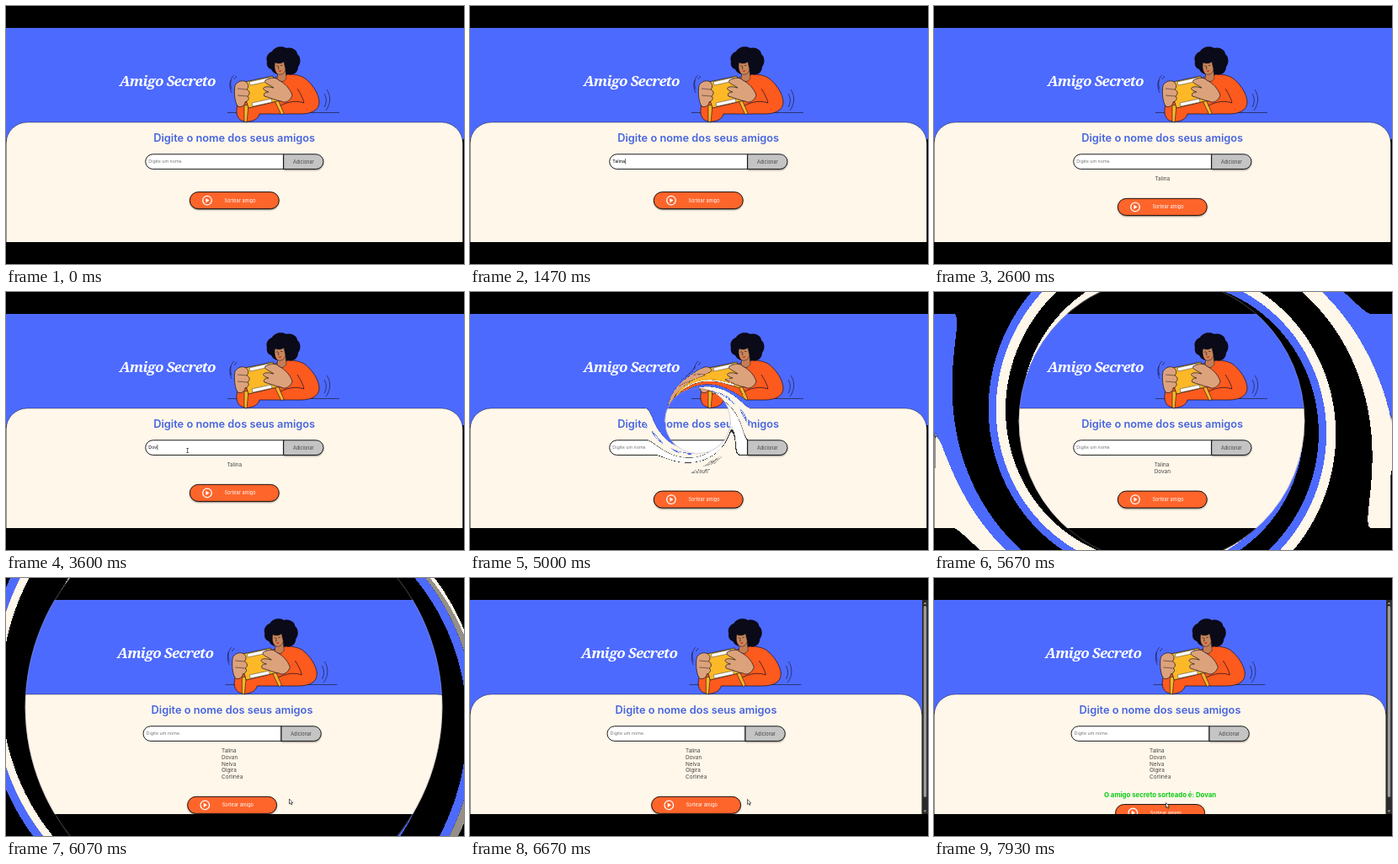
These frames come from a looping animation (544x306 px, 8140 ms). An HTML page with a canvas:

```html
<!DOCTYPE html>
<html lang="pt-BR">
<head>
<meta charset="utf-8">
<title>Amigo Secreto</title>
<style>
html, body { margin: 0; width: 100%; height: 100%; overflow: hidden; background: #000; }
canvas { display: block; }
</style>
</head>
<body>
<canvas id="stage" width="544" height="306"></canvas>
<script>
const LOOP = 8140, WIDTH = 544, HEIGHT = 306;
const CUT = 5720, RESULT = 7530, SWIRL_START = 4800, SWIRL_END = 6410;
const BLUE = '#4d6afe', CREAM = '#fff7ea', ORANGE = '#fe652b', INK = '#111122';
const SKIN = '#dca27c', YELLOW = '#fdb827', SHIRT = '#fd5a1e';

const names = ['Talina', 'Dovan', 'Nelva', 'Olgira', 'Corlinéa'];
const typing = [
  { name: names[0], keys: [800, 870, 1000, 1200, 1270, 1470], sent: 1930 },
  { name: names[1], keys: [3130, 3330, 3530, 3670, 3730], sent: 4070 },
];

const screen = document.getElementById('stage').getContext('2d');
const page = Object.assign(document.createElement('canvas'), { width: WIDTH, height: HEIGHT });
const g = page.getContext('2d', { willReadFrequently: true });
const warped = screen.createImageData(WIDTH, HEIGHT);
const warpedPixels = new Uint32Array(warped.data.buffer);

function text(str, x, y, font, color, align = 'left') {
  g.font = font;
  g.fillStyle = color;
  g.textAlign = align;
  g.fillText(str, x, y);
}

function shape(d, fill, stroke, width = 0.7) {
  const path = new Path2D(d);
  if (fill) { g.fillStyle = fill; g.fill(path); }
  if (stroke) { g.strokeStyle = stroke; g.lineWidth = width; g.stroke(path); }
}

function pill(x, y, w, h, radii, fill, shadow) {
  g.save();
  g.beginPath();
  g.roundRect(x, y, w, h, radii);
  if (shadow) {
    g.shadowColor = 'rgba(0,0,0,.45)';
    g.shadowOffsetY = 1.4;
    g.shadowBlur = 2;
  }
  g.fillStyle = fill;
  g.fill();
  g.restore();
  g.strokeStyle = '#000';
  g.lineWidth = 0.9;
  g.stroke();
}

function drawWoman() {
  shape('M263 126.5H396', null, INK, 0.6);
  // torso and arms
  shape('M318 86C330 79 345 80 354 85C364 92 372 105 372 114C372 124 362 128 350 128L301 128'
    + 'C300 134 292 138 284 137C275 136 272 128 275 117L290 112L312 100Z', SHIRT, INK);
  shape('M346 98C350 104 353 110 354 115M326 118C336 113 346 112 354 115', null, INK);
  // head
  shape('M310 66C308 60 312 55 316 54C319 48 328 47 333 50C340 48 346 53 346 57'
    + 'C351 61 350 69 347 72C347 79 341 83 335 81C328 84 317 81 315 75C311 74 309 70 310 66Z', '#0a0a18');
  shape('M323 77L332 76L333 86C330 91 325 90 322 87Z', '#c47e55', INK, 0.5);
  shape('M319.5 67C323 69 328 68 330 66L332 75C331 80 327 82 323 81C319 78 318.5 72 319.5 67Z', '#c98559', INK, 0.5);
  shape('M321 71H323M326 70.5H328.5M324 71L323.2 74.5H324.4', null, INK, 0.6);
  shape('M323 77Q325.5 76 327.5 76.5Q326 79.5 323 77Z', '#d9331f');
  // parcel
  shape('M283 118L288 117L286 138L283 137Z', YELLOW, INK, 0.6);
  shape('M318 110L322 109L330 127L327 129Z', YELLOW, INK, 0.6);
  shape('M279 91L317 83L326 112L288 121Z', YELLOW, INK);
  shape('M289 90L312 85L313 89L290 94Z', '#fff', INK, 0.4);
  shape('M292 115L315 110L316 114L293 119Z', '#fff', INK, 0.4);
  // hands
  shape('M272 94C276 88 282 88 285 90C289 93 288 97 286 99C290 101 290 105 287 107'
    + 'C290 110 287 113 284 114C284 119 276 122 274 117C271 110 271 100 272 94Z', SKIN, INK);
  shape('M308 88C312 86 319 83 324 88C332 92 338 99 340 106C338 112 332 116 327 113'
    + 'C321 112 314 109 307 107C305 104 308 102 312 102C305 100 304 97 308 96'
    + 'C312 95 316 97 318 97C313 93 306 92 308 88Z', SKIN, INK);
  shape('M275 98L286 99M275 106L287 107', null, INK, 0.5);
  // movement marks
  shape('M271 82C266 86 266 93 268 99M267 88C265 93 266 99 268 103M274 83L271 87', null, INK, 0.6);
  shape('M381 99C386 106 386 116 380 124M378 104C381 109 381 115 378 120', null, INK, 0.6);
}

function drawScrollbar() {
  g.fillStyle = '#2c2c2c';
  g.fillRect(537, 26, 7, 254);
  g.fillStyle = '#9b9b9b';
  g.beginPath();
  g.roundRect(538.8, 33, 3.4, 227, 1.7);
  g.fill();
  shape('M538.7 31L540.5 28.5L542.3 31ZM538.7 275.5L540.5 278L542.3 275.5Z', '#9b9b9b');
}

function drawInput(t) {
  pill(165.7, 175.8, 164, 17.6, [9, 0, 0, 9], '#fff');
  pill(329.7, 175.8, 47.3, 17.6, [0, 9, 9, 0], '#c4c4c4', true);
  text('Adicionar', 353.3, 186.5, '5.5px Inter, sans-serif', '#444', 'center');
  const entry = typing.find(e => t >= e.keys[0] && t < e.sent);
  const font = '5.33px Inter, sans-serif';
  if (!entry) return text('Digite um nome', 169.3, 186.3, font, '#757575');
  const typed = entry.name.slice(0, entry.keys.filter(k => t >= k).length);
  text(typed, 169.3, 186.3, font, '#000');
  g.fillRect(169.7 + g.measureText(typed).width, 181, 0.6, 6.5);
}

function drawList(count) {
  const shown = names.slice(0, count);
  g.font = '6.4px Inter, sans-serif';
  const left = 271.3 - Math.max(0, ...shown.map(n => g.measureText(n).width)) / 2;
  shown.forEach((n, i) => text(n, left, 207.2 + i * 7.75, g.font, '#444'));
}

function drawDrawButton(y) {
  pill(218.3, y, 106, 20, 10, ORANGE, true);
  g.strokeStyle = '#fff';
  g.lineWidth = 1.3;
  g.beginPath();
  g.arc(239, y + 10, 5.3, 0, 7);
  g.stroke();
  shape(`M237.4 ${y + 7.3}L241.6 ${y + 10}L237.4 ${y + 12.7}Z`, '#fff');
  text('Sortear amigo', 278, y + 12, '5.6px Inter, sans-serif', '#fff', 'center');
}

function drawPointer(t) {
  if (t >= 2800 && t < 4070) {
    shape('M214.3 185.5H217M215.6 185.5V190.5M214.3 190.5H217', null, '#222', 0.7);
  }
  if (t >= CUT) {
    const p = Math.min(1, Math.max(0, (t - 6530) / 670));
    const ease = p * p * (3 - 2 * p);
    g.save();
    g.translate(336.5 - 61 * ease, 262 + 4.5 * ease);
    shape('M0 0V6L1.4 4.8L2.4 7L3.3 6.6L2.4 4.5H4.2Z', '#fff', '#000', 0.6);
    g.restore();
  }
}

function drawPage(t) {
  const scrolled = t >= CUT, drawn = t >= RESULT;
  const count = scrolled ? 5 : typing.filter(e => t >= e.sent).length;
  g.fillStyle = '#000';
  g.fillRect(0, 0, WIDTH, HEIGHT);
  g.save();
  g.beginPath();
  g.rect(0, 26, WIDTH, 254);
  g.clip();
  g.fillStyle = BLUE;
  g.fillRect(0, 26, WIDTH, 132);

  g.fillStyle = CREAM;
  g.beginPath();
  g.roundRect(0.2, 138, scrolled ? 536.6 : 542.3, 160, [25, 25, 0, 0]);
  g.fill();
  g.strokeStyle = '#000';
  g.lineWidth = 0.4;
  g.stroke();

  g.save();
  if (scrolled) g.translate(-2.7, 0);
  g.letterSpacing = '-0.75px';
  text('Amigo Secreto', 134.8, 95.3, 'italic 700 17px "Noto Serif", serif', '#fff');
  g.letterSpacing = '0px';
  drawWoman();
  text('Digite o nome dos seus amigos', 271.2, 161.4, '600 12.8px Inter, sans-serif', '#4765e0', 'center');
  drawInput(t);
  drawList(count);
  if (drawn) {
    text(`O amigo secreto sorteado é: ${names[1]}`, 271.3, 259.5, '700 7.8px Inter, sans-serif', '#0ccc14', 'center');
  }
  drawDrawButton(220.6 + count * 7.75 + (drawn ? 9.2 : 0));
  g.restore();

  if (scrolled) drawScrollbar();
  drawPointer(t);
  g.restore();
}

// Twists the page before the cut around a calm, growing disc that shows the current page.
function drawSwirl(t) {
  const cx = 270.5, cy = 153, age = t - SWIRL_START;
  const inner = 0.195 * age, outer = 0.32 * age;
  const strength = Math.min(1690, 2 * age) * Math.PI / 180;
  const clamp = (v, max) => Math.min(max, Math.max(0, Math.round(v)));

  drawPage(Math.min(t, CUT - 1));
  const source = new Uint32Array(g.getImageData(0, 0, WIDTH, HEIGHT).data.buffer);
  for (let y = 0, i = 0; y < HEIGHT; y++) {
    for (let x = 0; x < WIDTH; x++, i++) {
      const dx = x - cx, dy = y - cy, r = Math.hypot(dx, dy);
      if (r >= outer) {
        warpedPixels[i] = source[i];
        continue;
      }
      const angle = strength * (1 - r / outer) ** 1.85;
      const cos = Math.cos(angle), sin = Math.sin(angle);
      const sx = clamp(cx + dx * cos - dy * sin, WIDTH - 3);
      const sy = clamp(cy + dx * sin + dy * cos, HEIGHT - 1);
      warpedPixels[i] = source[sy * WIDTH + sx];
    }
  }
  screen.putImageData(warped, 0, 0);

  drawPage(t);
  screen.save();
  screen.beginPath();
  screen.arc(cx, cy, inner, 0, 7);
  screen.clip();
  screen.drawImage(page, 0, 0);
  screen.strokeStyle = 'rgba(150,150,165,.4)';
  screen.lineWidth = 2;
  screen.stroke();
  screen.restore();
}

function frame() {
  const t = performance.now() % LOOP;
  if (t > SWIRL_START && t < SWIRL_END) {
    drawSwirl(t);
  } else {
    drawPage(t);
    screen.drawImage(page, 0, 0);
  }
  requestAnimationFrame(frame);
}
frame();
</script>
</body>
</html>
```
